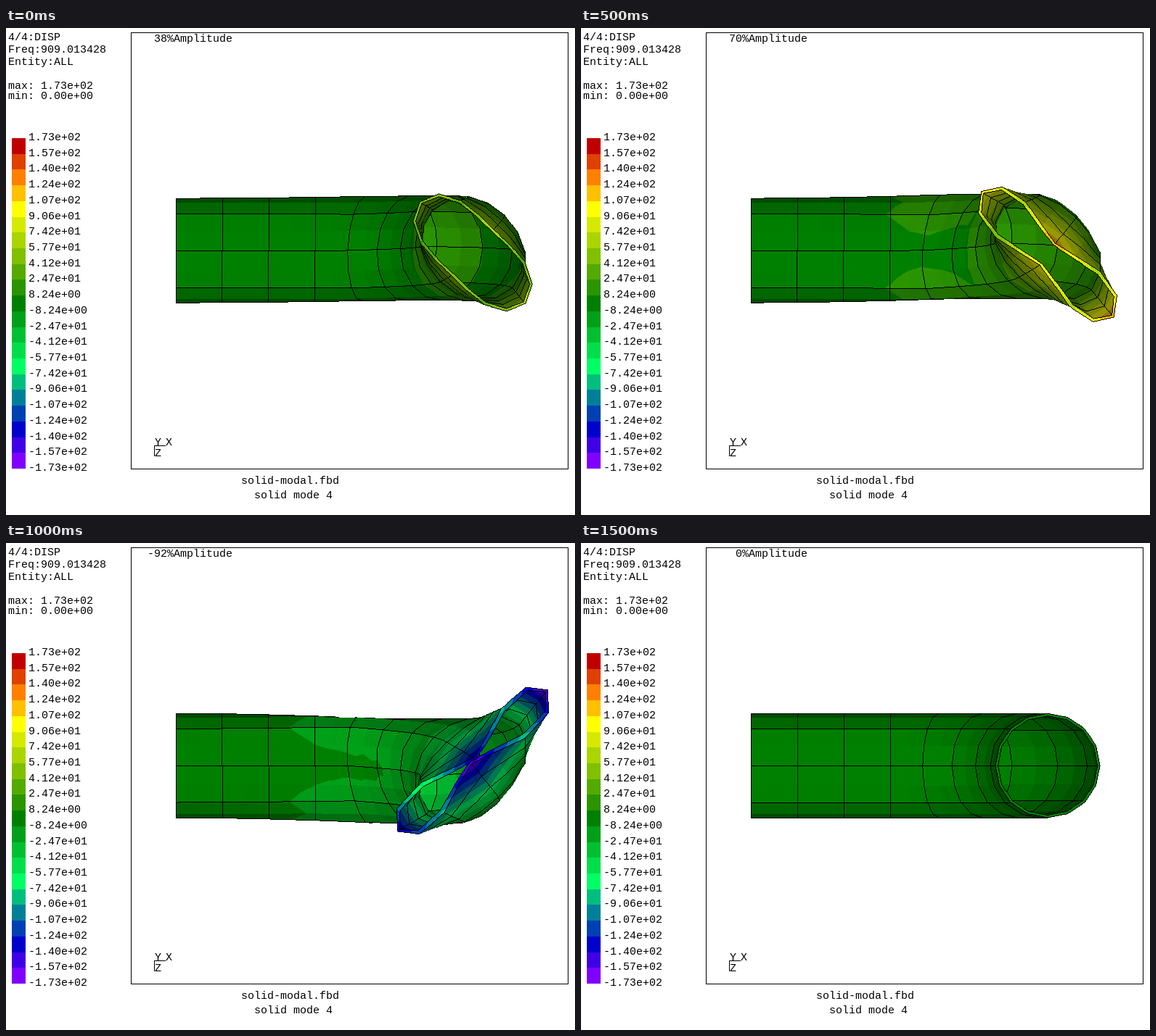
These frames come from a looping animation (784 by 672 pixels, 1600 ms). An HTML page with a canvas:

```html
<!DOCTYPE html>
<html lang="en">
<head>
<meta charset="utf-8">
<title>solid mode 4</title>
<style>
html, body { margin: 0; overflow: hidden; background: #fff; }
canvas { display: block; }
</style>
</head>
<body>
<canvas id="stage" width="784" height="672"></canvas>
<script>
const W = 784, H = 672, BANDS = 21, PEAK = 173.05;
const AROUND = 16, STATIONS = 22;          // two facets per element
const LEFT = 233.5, CY = 306.6, OUTER = 72, WALL = 3.5, BEND = 217, ELEMENT = 64;
const ctx = document.getElementById('stage').getContext('2d');
const image = ctx.createImageData(W, H);
const pixels = new Uint32Array(image.data.buffer);
const depth = new Float32Array(W * H);

// Mode shape at element borders along the pipe: ovalisation and vertical shift
const OVAL = [0, -1, -4, -8, -13, -9, -2, 8, 22, 38, 56, 76];
const SHIFT = [0, -.5, -2, -4, -7, -8.5, -8.5, -8, -6, -2, 2.5, 7.3];

const STOPS = [[0, 192, 0, 0], [2, 255, 128, 0], [4, 255, 255, 0], [10, 0, 128, 0],
               [14, 0, 255, 100], [18, 0, 0, 204], [20, 128, 0, 255]];
const palette = Array.from({ length: BANDS }, (_, i) => {
  const k = Math.max(1, STOPS.findIndex(s => s[0] >= i));
  const a = STOPS[k - 1], b = STOPS[k], f = (i - a[0]) / (b[0] - a[0]);
  return [1, 2, 3].map(c => Math.round(a[c] + (b[c] - a[c]) * f));
});

const clamp = (v, lo, hi) => Math.min(hi, Math.max(lo, v));
function sample(table, e) {
  const i = Math.min(Math.floor(e), table.length - 2);
  return table[i] + (table[i + 1] - table[i]) * (e - i);
}

// Point of the shell at station i, angle index j, `inset` below the outer skin
function node(i, j, inset, amp) {
  const e = i / 2, phi = j * 2 * Math.PI / AROUND, s = Math.sin(phi), c = Math.cos(phi);
  const theta = clamp(e - 3, 0, 5) * Math.PI / 10, st = Math.sin(theta), ct = Math.cos(theta);
  const oval = sample(OVAL, e), twist = 4.5 * (e / 11) ** 3;
  const slip = -inset * 1.5 * oval * Math.cos(2 * phi) / OUTER;
  const out = -(.75 * oval + twist) * s - .25 * oval * Math.sin(3 * phi) - slip * s;
  const down = sample(SHIFT, e) + (.75 * oval - twist) * c - .25 * oval * Math.cos(3 * phi) - slip * c;
  const along = .2 * e * s * amp;
  const r = OUTER - inset, p = r * c + out * amp;
  return {
    x: LEFT + ELEMENT * Math.min(e, 3) + BEND * st + p * st + along * ct,
    y: CY - r * s + down * amp,
    z: BEND * (1 - ct) + ELEMENT * Math.max(e - 8, 0) - p * ct + along * st,
    v: 2.1 * Math.hypot(out, down) * amp
  };
}

function triangle(p, q, r, light) {
  const qx = q.x - p.x, qy = q.y - p.y, rx = r.x - p.x, ry = r.y - p.y, d = qx * ry - qy * rx;
  if (Math.abs(d) < 1e-6) return;
  const x1 = Math.max(p.x, q.x, r.x), y1 = Math.max(p.y, q.y, r.y);
  for (let y = Math.ceil(Math.min(p.y, q.y, r.y)); y <= y1; y++) {
    for (let x = Math.ceil(Math.min(p.x, q.x, r.x)); x <= x1; x++) {
      const dx = x - p.x, dy = y - p.y, u = (dx * ry - dy * rx) / d, w = (qx * dy - qy * dx) / d;
      if (u < -1e-6 || w < -1e-6 || u + w > 1.000001) continue;
      const at = y * W + x, z = p.z + u * (q.z - p.z) + w * (r.z - p.z);
      if (z <= depth[at]) continue;
      depth[at] = z;
      const value = p.v + u * (q.v - p.v) + w * (r.v - p.v);
      const [R, G, B] = palette[clamp(Math.round(10 - value * BANDS / (2 * PEAK)), 0, BANDS - 1)];
      pixels[at] = 0xff000000 | B * light << 16 | G * light << 8 | R * light;
    }
  }
}

function line(a, b) {
  const n = Math.ceil(Math.max(Math.abs(b.x - a.x), Math.abs(b.y - a.y))) || 1;
  for (let k = 0; k <= n; k++) {
    const f = k / n, at = Math.round(a.y + (b.y - a.y) * f) * W + Math.round(a.x + (b.x - a.x) * f);
    if (a.z + (b.z - a.z) * f + 8 > depth[at]) pixels[at] = 0xff000000;
  }
}

// Cosine between the quad's normal and the view direction
function facing(a, b, c, d) {
  const ux = d.x - b.x, uy = d.y - b.y, uz = d.z - b.z;
  const vx = c.x - a.x, vy = c.y - a.y, vz = c.z - a.z;
  const nz = ux * vy - uy * vx;
  return nz / (Math.hypot(uy * vz - uz * vy, uz * vx - ux * vz, nz) || 1);
}

function drawPipe(amp) {
  pixels.fill(0xffffffff);
  depth.fill(-1e9);
  const edges = [], shells = [];
  const fill = (a, b, c, d, light) => {
    triangle(a, b, c, light);
    triangle(a, c, d, light);
  };
  for (const inset of [0, WALL]) {
    const grid = [];
    for (let i = 0; i <= STATIONS; i++) {
      grid.push(Array.from({ length: AROUND + 1 }, (_, j) => node(i, j, inset, amp)));
    }
    shells.push(grid);
    for (let i = 0; i < STATIONS; i++) for (let j = 0; j < AROUND; j++) {
      const a = grid[i][j], b = grid[i][j + 1], c = grid[i + 1][j + 1], d = grid[i + 1][j];
      const nz = facing(a, b, c, d) * (inset ? -1 : 1);
      if (nz <= 1e-6) continue;
      fill(a, b, c, d, Math.min(1, .45 + .65 * nz));
      edges.push(j % 2 ? [b, c] : [a, d], i % 2 ? [d, c] : [a, b]);
    }
  }
  const [skin, lining] = shells.map(g => g[STATIONS]);
  for (let j = 0; j < AROUND; j++) {
    fill(skin[j], skin[j + 1], lining[j + 1], lining[j], 1);
    edges.push([skin[j], skin[j + 1]], [lining[j], lining[j + 1]]);
  }
  for (const [a, b] of edges) line(a, b);
  ctx.putImageData(image, 0, 0);
}

function drawLabels(amp) {
  const pitch = 456 / BANDS;
  palette.forEach((rgb, i) => {
    const top = Math.round(152 + i * pitch);
    ctx.fillStyle = `rgb(${rgb})`;
    ctx.fillRect(8, top, 19, Math.round(152 + (i + 1) * pitch) - top);
  });
  ctx.fillStyle = '#000';
  ctx.font = '15px "Liberation Mono", monospace';
  for (let i = 0; i <= BANDS; i++) {
    const value = PEAK * (BANDS - 2 * i) / BANDS;
    ctx.fillText(value.toExponential(2).replace(/(\d)$/, '0$1'), 31, Math.round(155 + i * pitch));
  }
  const percent = String(Math.trunc(amp * 100)).padStart(4);
  for (const [text, x, y] of [
    ['4/4:DISP', 3, 17], ['Freq:909.013428', 3, 34], ['Entity:ALL', 3, 51],
    ['max: 1.73e+02', 3, 84], ['min: 0.00e+00', 3, 98],
    [percent + '%Amplitude', 186, 19],
    ['solid-modal.fbd', 324, 629], ['solid mode 4', 342, 649],
    ['Y', 205, 576], ['X', 220, 576], ['Z', 205, 591]
  ]) ctx.fillText(text, x, y);
  ctx.fillRect(204, 576, 1, 15);
  ctx.fillRect(204, 576, 16, 1);
  ctx.strokeRect(172.5, 6.5, 602, 602);
}

let shown = -1;
function tick() {
  const step = Math.floor(performance.now() / 100) % 16;
  if (step !== shown) {
    shown = step;
    const amp = Math.sin((step + 1) * Math.PI / 8);
    drawPipe(amp);
    drawLabels(amp);
  }
  requestAnimationFrame(tick);
}
tick();
</script>
</body>
</html>
```
